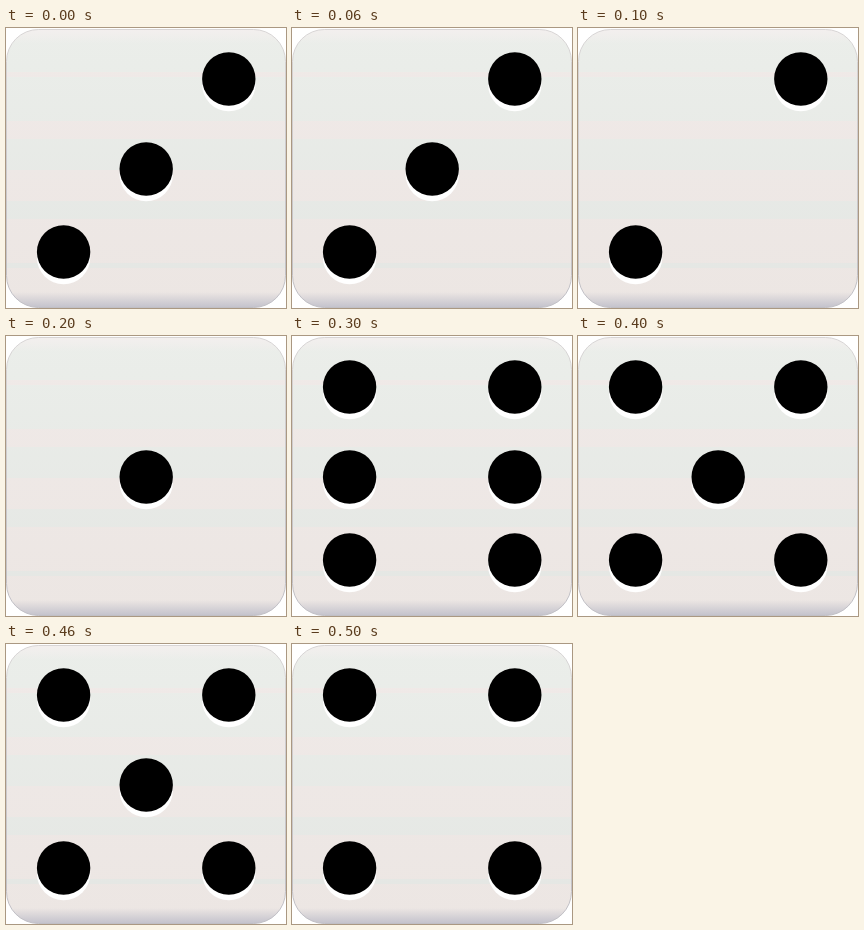
An HTML page with a canvas that plays this animation: 280 px wide and 280 px high, repeating every 600 ms.

```html
<!DOCTYPE html>
<html lang="en">
<head>
<meta charset="utf-8">
<title>Rolling die</title>
<style>
  html, body { margin: 0; width: 100%; height: 100%; overflow: hidden; background: #fff; }
  canvas { display: block; width: 100vw; height: 100vh; }
</style>
</head>
<body>
<canvas id="die" width="280" height="280"></canvas>
<script>
const ctx = document.getElementById('die').getContext('2d');
const SIZE = 280, STEP = 100, RADIUS = 26.7, CORNER = 32;
const LEFT = 57.6, CENTER = 140.2, RIGHT = 222.8;
const TOP = 51, MIDDLE = 141, BOTTOM = 224;

function disc(x, y, color) {
  ctx.fillStyle = color;
  ctx.beginPath();
  ctx.arc(x, y, RADIUS, 0, Math.PI * 2);
  ctx.fill();
}

function pip(x, y) {
  disc(x, y + 5.5, '#fff');
  disc(x, y, '#000');
}

// Vertical fade from one colour to another
function fade(y0, y1, from, to) {
  const g = ctx.createLinearGradient(0, y0, 0, y1);
  g.addColorStop(0, from);
  g.addColorStop(1, to);
  return g;
}

function drawBody() {
  ctx.fillStyle = '#fff';
  ctx.fillRect(0, 0, SIZE, SIZE);
  ctx.beginPath();
  ctx.roundRect(0.5, 1.5, 279, 278, CORNER);
  ctx.save();
  ctx.clip();
  ctx.fillStyle = fade(0, SIZE, '#ebeeea', '#e4e6e3');
  ctx.fillRect(0, 0, SIZE, SIZE);

  // Evenly spaced warm stripes that widen towards the bottom
  ctx.fillStyle = fade(0, SIZE, '#f0eae8', '#ece6e3');
  for (let i = 0; i < 5; i++) ctx.fillRect(0, 44 + 49 * i, SIZE, 5 + 13 * i);

  ctx.fillStyle = fade(2, 16, '#f3efee', 'rgba(243,239,238,0)');
  ctx.fillRect(0, 0, SIZE, 16);
  ctx.fillStyle = fade(264, SIZE, 'rgba(194,193,203,0)', '#c2c1cb');
  ctx.fillRect(0, 264, SIZE, 16);
  ctx.restore();

  ctx.strokeStyle = fade(0, SIZE, '#d8d5d5', '#c0bfc5');
  ctx.stroke();
}

function drawPips(value) {
  if (value % 2) pip(CENTER, MIDDLE);
  if (value > 1) {
    pip(RIGHT, TOP);
    pip(LEFT, BOTTOM);
  }
  if (value > 3) {
    pip(LEFT, TOP);
    pip(RIGHT, BOTTOM);
  }
  if (value === 6) {
    pip(LEFT, MIDDLE);
    pip(RIGHT, MIDDLE);
  }
}

// Counts down from three, wrapping from one to six
function draw(now) {
  const step = Math.floor(now / STEP) % 6;
  drawBody();
  drawPips((8 - step) % 6 + 1);
}

let start;
function tick(now) {
  start ??= now;
  draw(now - start);
  requestAnimationFrame(tick);
}
draw(0);
requestAnimationFrame(tick);
</script>
</body>
</html>
```
